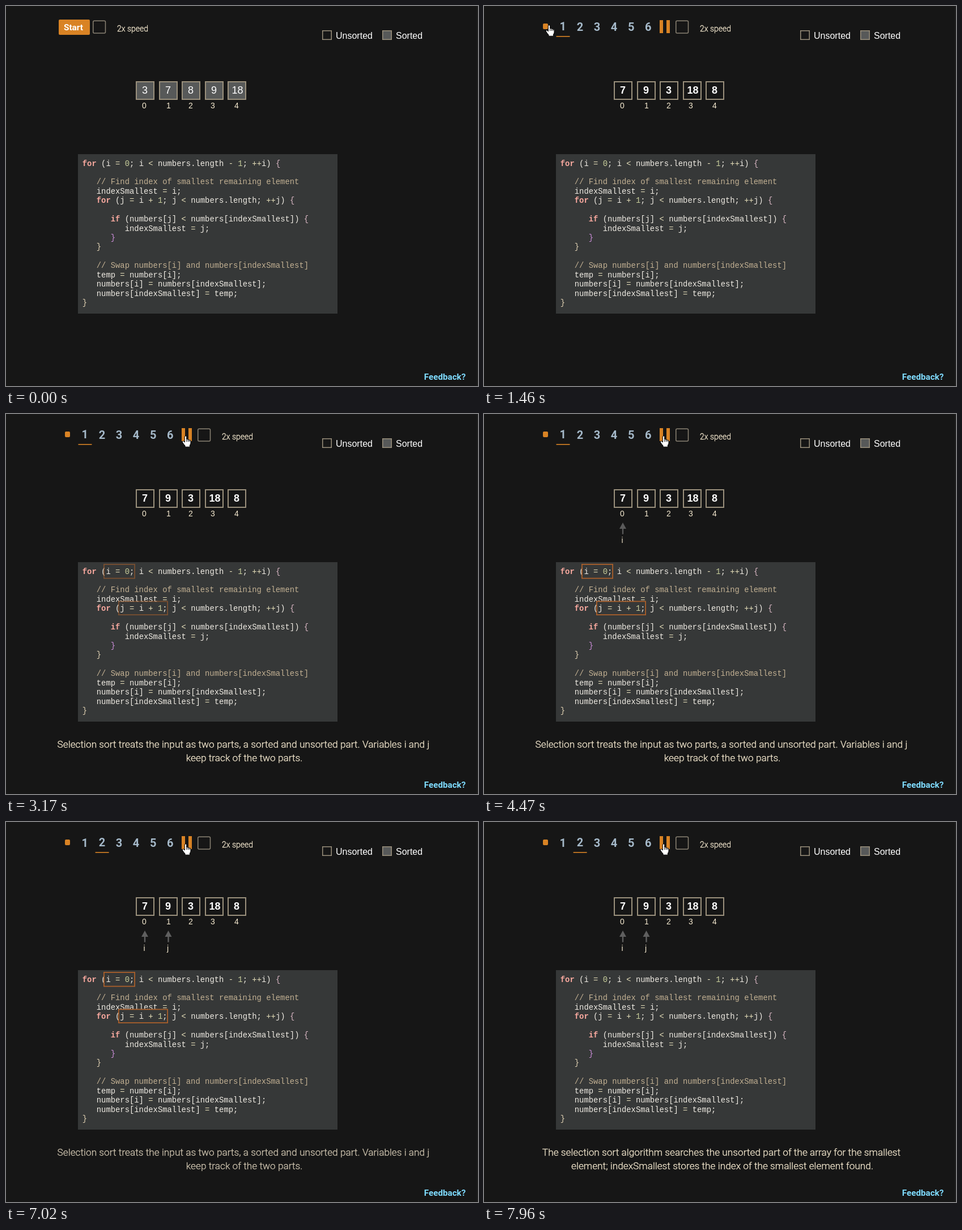
Write an HTML page with a canvas that moves like this. It is 833 by 672 pixels and loops after 8000 ms.

```html
<!DOCTYPE html>
<html lang="en">
<head>
<meta charset="utf-8">
<title>Selection sort</title>
<style>
html, body { margin: 0; width: 100%; height: 100%; overflow: hidden; background: #161616; }
canvas { display: block; }
</style>
</head>
<body>
<canvas id="stage" width="833" height="672"></canvas>
<script>
const ctx = document.getElementById('stage').getContext('2d');
const LOOP = 8000, START = 1390, DONE = 5700, NEXT = 6930;
const ORANGE = '#d98324', BORDER = '#9a907c', CREAM = '#f6ead0';
const SANS = '"Liberation Sans", Arial, sans-serif';
const ROBOTO = 'Roboto, sans-serif';
const MONO = '"Liberation Mono", "Courier New", monospace';

const code = [
  'for (i = 0; i < numbers.length - 1; ++i) {',
  '',
  '   // Find index of smallest remaining element',
  '   indexSmallest = i;',
  '   for (j = i + 1; j < numbers.length; ++j) {',
  '',
  '      if (numbers[j] < numbers[indexSmallest]) {',
  '         indexSmallest = j;',
  '      }',
  '   }',
  '',
  '   // Swap numbers[i] and numbers[indexSmallest]',
  '   temp = numbers[i];',
  '   numbers[i] = numbers[indexSmallest];',
  '   numbers[indexSmallest] = temp;',
  '}'
];
const captions = [
  ['Selection sort treats the input as two parts, a sorted and unsorted part. Variables i and j',
   'keep track of the two parts.'],
  ['The selection sort algorithm searches the unsorted part of the array for the smallest',
   'element; indexSmallest stores the index of the smallest element found.']
];

// Pointer tip: time, x, y
const path = [
  [70, 759, 410], [850, 143, 61], [1320, 115, 34], [1780, 115, 34],
  [2390, 283, 46], [2740, 317, 39]
];

const clamp = v => Math.max(0, Math.min(1, v));
const ramp = (t, a, b) => clamp((t - a) / (b - a));
const swing = (t, a, b) => 0.5 - Math.cos(Math.PI * ramp(t, a, b)) / 2;

function text(s, x, y, font, color, align = 'left') {
  ctx.font = font;
  ctx.fillStyle = color;
  ctx.textAlign = align;
  ctx.fillText(s, x, y);
}

// Light text with slightly strengthened stems
function lightText(s, x, y, size, align) {
  text(s, x, y, `300 ${size}px ${ROBOTO}`, CREAM, align);
  ctx.strokeStyle = CREAM;
  ctx.lineWidth = 0.3;
  ctx.strokeText(s, x, y);
}

function rect(x, y, w, h, color) {
  ctx.fillStyle = color;
  ctx.fillRect(x, y, w, h);
}

function round(x, y, w, h, r, color) {
  ctx.fillStyle = color;
  ctx.beginPath();
  ctx.roundRect(x, y, w, h, r);
  ctx.fill();
}

// Outer edges of the frame are at x, y, x + w, y + h
function frame(x, y, w, h, color, line, fill) {
  if (fill) rect(x, y, w, h, fill);
  ctx.strokeStyle = color;
  ctx.lineWidth = line;
  ctx.strokeRect(x + line / 2, y + line / 2, w - line, h - line);
}

function poly(points, color) {
  ctx.fillStyle = color;
  ctx.beginPath();
  points.forEach(p => ctx.lineTo(p[0], p[1]));
  ctx.closePath();
  ctx.fill();
}

function faded(alpha, draw) {
  if (alpha <= 0) return;
  ctx.save();
  ctx.globalAlpha = alpha;
  draw();
  ctx.restore();
}

function tokenColor(s) {
  if (s.startsWith('//')) return '#c3b193';
  if (/^(for|if)$/.test(s)) return '#fbaaa0';
  if (/^\d/.test(s)) return '#c9cf9c';
  if (/^[=<+-]/.test(s)) return '#e6dfba';
  if (s === '{') return '#dcb9c6';
  return '#f0ece4';
}

function drawCode() {
  rect(127, 262, 458, 282, '#363838');
  code.forEach((line, n) => {
    const y = 282.6 + n * 16.43;
    for (const m of line.matchAll(/\/\/.*|\b(?:for|if)\b|\d+|[=<+-]+|[{}]|[^\s=<+{}-]+/g)) {
      const s = m[0];
      let color = tokenColor(s);
      if (s === '}') color = m.index === 6 ? '#cf8fdc' : '#e2d3b4';
      const bold = s === 'for' || s === 'if' ? 'bold ' : '';
      text(s, 134.8 + m.index * 8.32, y, bold + '13.87px ' + MONO, color);
    }
  });
}

function drawArray(sorted) {
  const values = sorted ? [3, 7, 8, 9, 18] : [7, 9, 3, 18, 8];
  const labels = [244, 287, 326, 365, 407];
  const weight = sorted ? '' : 'bold ';
  values.forEach((v, k) => {
    const x = Math.round(229 + k * 40.6);
    frame(x, 133, 33, 33, BORDER, 2, sorted ? '#575959' : null);
    text(v, x + (v > 9 ? 17.5 : 16), 155, weight + '18px ' + SANS, '#ffffff', 'center');
    text(k, labels[k], 181, '14px ' + SANS, CREAM, 'center');
  });
}

function drawLegend() {
  frame(558, 43, 17, 17, BORDER, 1.5);
  text('Unsorted', 582, 58, '16px ' + SANS, '#ffffff');
  frame(664, 43, 17, 17, BORDER, 1.5, '#575959');
  text('Sorted', 688, 58, '16px ' + SANS, '#ffffff');
}

function drawSpeed(x) {
  ctx.strokeStyle = '#8b8374';
  ctx.lineWidth = 1.5;
  ctx.beginPath();
  ctx.roundRect(x + 0.75, 26.25, 21.75, 21.75, 2);
  ctx.stroke();
  lightText('2x speed', x + 43, 45, 14, 'left');
}

// Time at which the pointer first reaches x while crossing the steps
function reach(x) {
  const a = path[3], b = path[4], c = path[5];
  const [p, q] = x < b[1] ? [a, b] : [b, c];
  return p[0] + (q[0] - p[0]) * (x - p[1]) / (q[1] - p[1]);
}

function hover(t, x) {
  const enter = reach(x), leave = reach(x + 25);
  return ramp(t, enter, enter + 90) * (1 - ramp(t, leave + 20, leave + 130));
}

function drawControls(t) {
  if (t < START) {
    round(93, 24, 55, 27, 2, ORANGE);
    text('Start', 119, 42.5, 'bold 15.4px ' + ROBOTO, '#ffffff', 'center');
    drawSpeed(153);
    return;
  }
  round(104, 31, 9, 10, 2, ORANGE);
  const current = t < NEXT ? 0 : 1;
  for (let k = 0; k < 6; k++) {
    const x = 127 + k * 30.1;
    const y = k === current ? 43 : 44;
    const h = hover(t, x);
    faded(h, () => round(x, 18, 25, 37, 4, '#3a2513'));
    text(k + 1, x + 12.3, y, 'bold 20px ' + ROBOTO, '#a5b9c9', 'center');
    faded(h, () => text(k + 1, x + 12.3, y, 'bold 20px ' + ROBOTO, '#e6dccb', 'center'));
    if (k === current) rect(x + 0.5, 53, 24, 1.6, ORANGE);
  }
  if (t >= DONE && t < NEXT) {
    const d = 11.5 * swing(t, DONE, DONE + 200);
    poly([[310, 25], [328, 25 + d], [328, 48 - d], [310, 48]], ORANGE);
  } else {
    rect(310, 25, 6, 23, ORANGE);
    rect(322, 25, 6, 23, ORANGE);
  }
  drawSpeed(338);
}

function drawMarker(x, labelX, name) {
  poly([[x, 192], [x + 6, 203], [x - 6, 203]], '#5f5f5f');
  rect(x - 1.2, 202, 2.4, 10.5, '#5f5f5f');
  text(name, labelX, 228, '14px ' + SANS, CREAM, 'center');
}

function drawCaption(lines) {
  lines.forEach((s, k) => lightText(s, 419 + k * 1.6, 590 + k * 24, 17.3, 'center'));
}

function pointerAt(t) {
  let k = 0;
  while (k < path.length - 2 && t >= path[k + 1][0]) k++;
  const a = path[k], b = path[k + 1];
  const p = k === 0 ? swing(t, a[0], b[0]) : ramp(t, a[0], b[0]);
  return [a[1] + (b[1] - a[1]) * p, a[2] + (b[2] - a[2]) * p];
}

const arrow = new Path2D('M0 0V16.5L3.8 12.9L6.3 18.6L8.9 17.5L6.4 11.9H11.7Z');
const hand = new Path2D('M-1.7 1.2Q-1.5 -.3 0 -.3Q1.6 -.3 1.7 1.2V6.2Q3.6 5 4.5 6.7' +
  'Q6.2 5.6 7 7.4Q9 6.7 9 8.8V12.5Q8.8 14.5 7.4 16.2V19.2H-1V17Q-3.5 14.5 -5.6 10.9' +
  'Q-6 9 -4.4 8.8Q-3 8.9 -1.7 11Z');

function drawPointer(t) {
  if (t < 70) return;
  const [x, y] = pointerAt(t).map(Math.round);
  const overStart = x >= 93 && x <= 148 && y <= 51;
  const shape = overStart || t >= START ? hand : arrow;
  ctx.save();
  ctx.translate(x, y);
  ctx.fillStyle = '#ffffff';
  ctx.strokeStyle = '#000000';
  ctx.lineWidth = 1;
  ctx.lineJoin = 'round';
  ctx.fill(shape);
  ctx.stroke(shape);
  if (shape === hand) {
    ctx.beginPath();
    for (const fx of [1.7, 4.4, 6.9]) {
      ctx.moveTo(fx, 7);
      ctx.lineTo(fx, 10);
    }
    ctx.stroke();
  }
  ctx.restore();
}

function draw(t) {
  rect(0, 0, 833, 672, '#161616');
  rect(831, 0, 2, 672, '#1f1f1f');
  drawControls(t);
  drawLegend();
  drawArray(t < START);
  drawCode();

  faded(swing(t, 2580, 3640) * (1 - swing(t, 7330, 7960)), () => {
    frame(172, 265, 56, 26.5, '#a95f2b', 1.8);
    frame(198, 330.5, 88, 25.5, '#a95f2b', 1.8);
  });
  faded(swing(t, 3620, 4640), () => drawMarker(245, 244, 'i'));
  faded(swing(t, 4640, 5680), () => drawMarker(286.5, 285.5, 'j'));

  faded(swing(t, 1750, 2180) * (1 - swing(t, 6910, 7280)), () => drawCaption(captions[0]));
  faded(swing(t, 7280, 7720), () => drawCaption(captions[1]));
  text('Feedback?', 811.3, 660.5, 'bold 15.2px ' + ROBOTO, '#7fdcff', 'right');
  drawPointer(t);
}

const origin = performance.now();
function tick() {
  draw((performance.now() - origin) % LOOP);
  requestAnimationFrame(tick);
}
tick();
</script>
</body>
</html>
```
